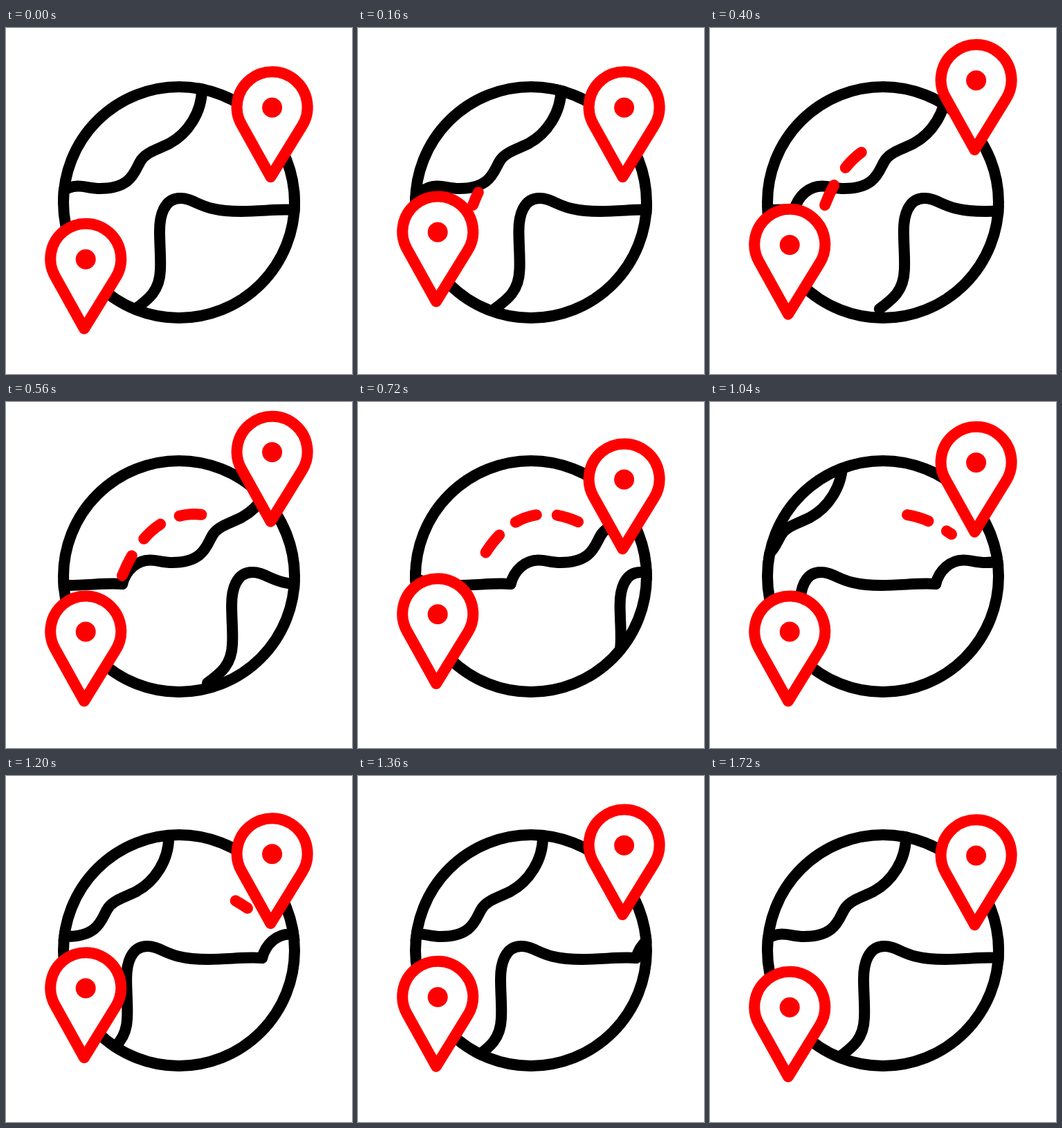
Write an HTML page that moves like this. It is 500 px wide and 500 px high and loops after 2000 ms.

```html
<!DOCTYPE html>
<html lang="en">
<head>
<meta charset="utf-8">
<title>Globe route</title>
<style>
  html, body { margin: 0; width: 100%; height: 100%; overflow: hidden; background: #fff; }
  svg { display: block; width: 100vw; height: 100vh; }
  .line { fill: none; stroke: #000; stroke-width: 16; stroke-linecap: round; stroke-linejoin: round; }
  .red { stroke: #f00; }
  .body { fill: #fff; }
  .dot { fill: #f00; }
</style>
</head>
<body>
<svg viewBox="0 0 500 500">
  <defs>
    <clipPath id="disc"><circle cx="250" cy="252" r="175"/></clipPath>
    <g id="land" class="line">
      <path d="M283 86C284 122 262 153 236 167C222 174 204 179 196 190C186 203 185 232 136 232C122 232 115 228.5 104 228.5C85 228.5 69 243 64 263"/>
      <path d="M418 263C395 261 370 265 340 265C279 265 275 246 252 246C228 246 222 272 222 293C222 316 224 332 223 350C222 380 206 392 187 406"/>
    </g>
    <g id="pin">
      <path class="line red body" d="M113 434.5L71 359A51 51 0 1 1 158.3 361Z"/>
      <circle class="dot" cx="115.2" cy="334.3" r="14.5"/>
    </g>
  </defs>
  <g clip-path="url(#disc)">
    <g id="map">
      <use href="#land" x="-354"/>
      <use href="#land"/>
      <use href="#land" x="354"/>
    </g>
  </g>
  <circle class="line" cx="250" cy="252" r="167"/>
  <path id="route" class="line red" d="M166 256C175 232 204 164 270 162C300 162 325 175 349 191"/>
  <use id="from" href="#pin"/>
  <use id="to" href="#pin"/>
</svg>
<script>
const LOOP = 2000, STEP = 40, DASH = 32, GAP = 30;
const [map, route, from, to] = ['map', 'route', 'from', 'to'].map(id => document.getElementById(id));
const routeLength = route.getTotalLength();
const hops = [[0, 0], [240, 53], [520, 0], [760, 29.7], [1000, 0], [1240, 29.7], [1480, 0]];

// Smooth 0..1 ramp between two times
function ramp(t, start, end) {
  const u = Math.min(1, Math.max(0, (t - start) / (end - start)));
  return u * u * (3 - 2 * u);
}

function hopHeight(t) {
  return hops.slice(1).reduce((height, [time, value], i) => {
    const [prevTime, prevValue] = hops[i];
    return height + (value - prevValue) * ramp(t, prevTime, time);
  }, 0);
}

function move(node, x, y) {
  node.setAttribute('transform', `translate(${x} ${y})`);
}

// The dash pattern begins at the trimmed start of the route
function drawRoute(t) {
  const end = routeLength * ramp(t, 18, 798);
  const start = routeLength * ramp(t, 480, 1360);
  const pattern = [];
  for (let pos = start; pos <= end; pos += DASH + GAP) {
    pattern.push(Math.min(DASH, end - pos), GAP);
  }
  pattern[pattern.length - 1] = 2 * routeLength;
  route.setAttribute('stroke-dasharray', pattern.join(' '));
  route.setAttribute('stroke-dashoffset', -start);
  route.setAttribute('visibility', t > 0 && t < 1400 ? 'visible' : 'hidden');
}

function draw(t) {
  move(map, 354 * ramp(t, 0, 1560), 0);
  drawRoute(t);
  move(from, 0, -hopHeight(t));
  move(to, 269.4, -219.3 - hopHeight(t - 240));
}

const begin = performance.now();
function tick() {
  const steps = Math.floor((performance.now() - begin) / STEP + 0.1);
  draw(steps * STEP % LOOP);
  requestAnimationFrame(tick);
}
tick();
</script>
</body>
</html>
```
